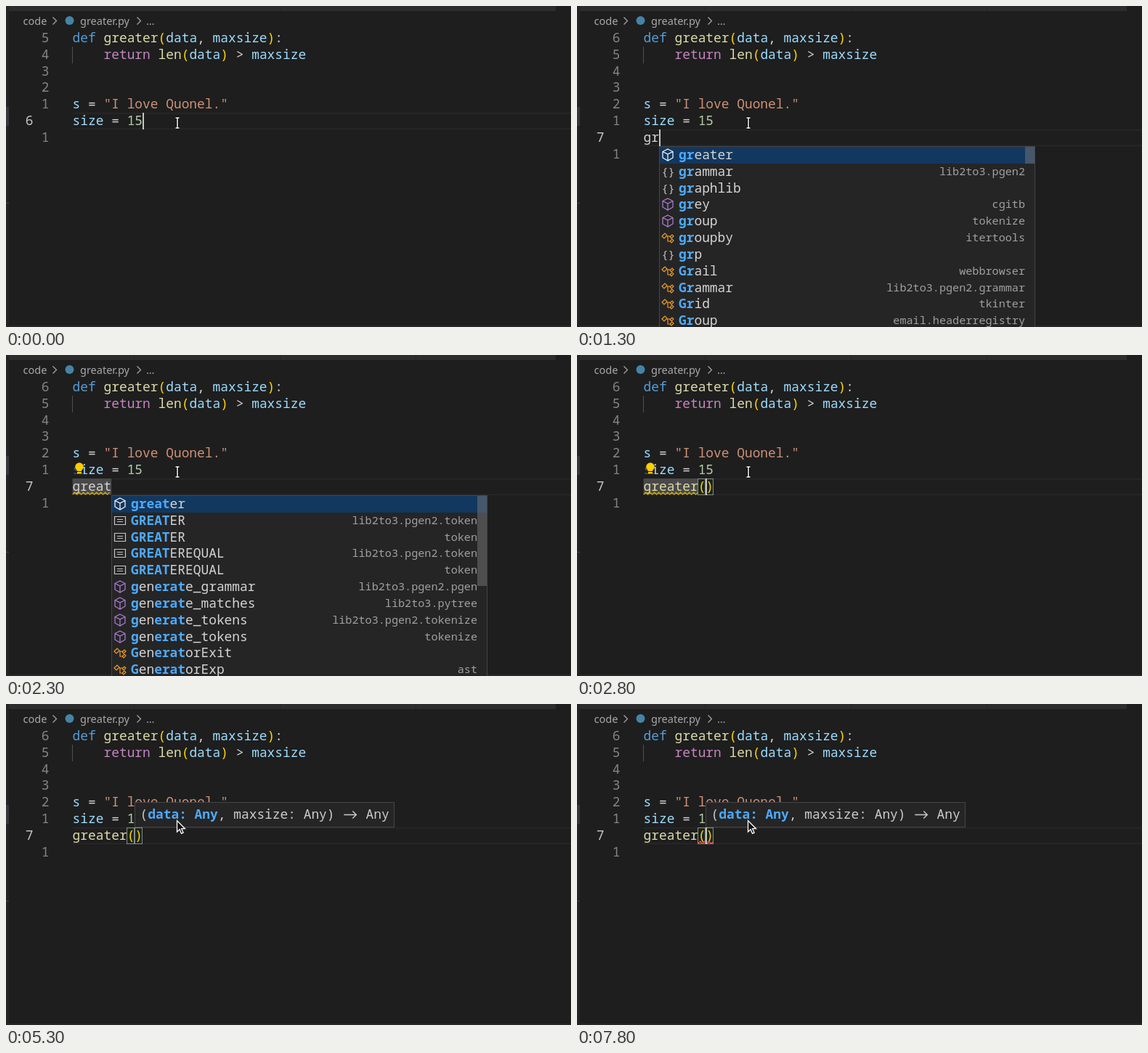
These frames come from a looping animation (778x442 px, 8 s). An HTML page with a canvas:

```html
<!DOCTYPE html>
<html lang="en">
<head>
<meta charset="utf-8">
<style>
  html, body { margin: 0; width: 100%; height: 100%; overflow: hidden; background: #1e1e1e; }
  canvas { display: block; }
</style>
</head>
<body>
<canvas id="stage" width="778" height="442"></canvas>
<script>
const ctx = document.getElementById('stage').getContext('2d');
const LOOP = 8000, LEFT = 91.6, CHAR = 10.72, LINE = 22.83;
const MONO = '"Noto Sans Mono", monospace';
const CODE = `17.87px ${MONO}`, BOLD = `bold ${CODE}`, SMALL = `15.15px ${MONO}`;
const FG = '#d4d4d4', VAR = '#9cdcfe', FUNC = '#dcdcaa', GOLD = '#ffd700', BLUE = '#4daafc';

const colX = col => LEFT + col * CHAR;
const baseline = row => Math.round(50 + row * LINE);
const lineTop = row => Math.round(32.8 + row * LINE);

// Each step: start time, typed text, caret column
const TYPING = [
  [600, '', 0], [1100, 'g', 1], [1200, 'gr', 2], [1500, 'gre', 3], [1600, 'grea', 4],
  [1800, 'great', 5], [2800, 'greater()', 8], [5700, 'greater(?)', 9], [7700, 'greater()', 8],
];

// In labels the matched and unmatched parts alternate, starting with matched
const SHORT = [
  ['cube', 'gr|eater'], ['module', 'gr|ammar', 'lib2to3.pgen2'], ['module', 'gr|aphlib'],
  ['func', 'gr|ey', 'cgitb'], ['func', 'gr|oup', 'tokenize'], ['type', 'gr|oupby', 'itertools'],
  ['module', 'gr|p'], ['type', 'Gr|ail', 'webbrowser'], ['type', 'Gr|ammar', 'lib2to3.pgen2.grammar'],
  ['type', 'Gr|id', 'tkinter'], ['type', 'Gr|oup', 'email.headerregistry'],
];
const longList = (tail, last) => [
  ['cube', tail ? 'great|er' : 'grea|ter'],
  ...['', '', 'EQUAL', 'EQUAL'].map((end, i) => [
    'const', (tail ? 'GREAT|ER' : 'GREA|TER') + end, i % 2 ? 'token' : 'lib2to3.pgen2.token']),
  ...[['grammar', 'lib2to3.pgen2.pgen'], ['matches', 'lib2to3.pytree'],
    ['tokens', 'lib2to3.pgen2.tokenize'], ['tokens', 'tokenize']].map(([end, from]) => [
    'func', (tail ? 'g|en|erat|e_' : 'g|en|era|te_') + end, from]),
  ...last,
];
const GREA = longList(false, [['func', 'ge|tf|ra|meinfo', 'inspect'], ['func', 'ge|tt|ra|ce', 'sys']]);
const GREAT = longList(true, [['type', 'G|en|erat|orExit'], ['type', 'G|en|erat|orExp', 'ast']]);

// Start time, anchor column, rows, scroll thumb height
const POPUPS = [[1300, 2, SHORT, 23], [1600, 3, GREA, 60], [1700, 4, GREA, 60], [1900, 5, GREAT, 124], [2800]];

const CUBE = new Path2D('M0-8 7-4.5V4L0 8-7 4V-4.5ZM-7-4.5 0-1 7-4.5M0-1V8');
const ICONS = {
  cube: ['#fff', CUBE],
  func: ['#b180d7', CUBE],
  type: ['#ee9d28', new Path2D('M-8-2-4-6-1-3-5 1ZM-2-2H4M0-2V5H3M3-1 6-4 8-2 5 1ZM3 5 6 2 8 4 5 7Z')],
  const: ['#c5c5c5', new Path2D('M-7.5-5.5H7.5V5.5H-7.5ZM-4-1.5H4M-4 1.5H4')],
};
const ARROW = new Path2D('M0 0V15.5L3.6 12.2 6 17.8 8.6 16.7 6.2 11.2H11Z');
const IBEAM = new Path2D('M-2.5-7H2.5M-2.5 7H2.5M0-7V7');

function rect(color, x, y, w, h) {
  ctx.fillStyle = color;
  ctx.fillRect(x, y, w, h);
}

function box(x, y, w, h, fill, border) {
  rect(fill, x, y, w, h);
  ctx.strokeStyle = border;
  ctx.lineWidth = 1;
  ctx.strokeRect(x + .5, y + .5, w - 1, h - 1);
}

function text(str, x, y, color, font = CODE, align = 'left') {
  ctx.font = font;
  ctx.textAlign = align;
  ctx.fillStyle = color;
  ctx.fillText(str, x, y);
}

function path(shape, x, y, color, width, fill) {
  ctx.save();
  ctx.translate(x, y);
  ctx.strokeStyle = color;
  ctx.lineWidth = width;
  if (fill) { ctx.fillStyle = fill; ctx.fill(shape); }
  ctx.stroke(shape);
  ctx.restore();
}

// parts: colour, string, colour, string, ...
function code(row, col, ...parts) {
  for (let i = 0; i < parts.length; i += 2) {
    text(parts[i + 1], colX(col), baseline(row), parts[i]);
    col += parts[i + 1].length;
  }
}

function squiggle(from, to, color) {
  ctx.beginPath();
  for (let x = colX(from), up = 0; x <= colX(to); x += 3, up ^= 1) ctx.lineTo(x, up ? 189.2 : 192);
  ctx.strokeStyle = color;
  ctx.lineWidth = 1.3;
  ctx.stroke();
}

function drawFrame() {
  rect('#1e1e1e', 0, 0, 778, 442);
  rect('#252526', 0, 0, 4, 442);
  rect('#37373d', 0, 139, 4, 26);
  rect('#45454a', 0, 271, 4, 1);
  rect('#2d2d2d', 4, 0, 753, 7);
  for (const x of [176, 377, 564]) rect('#252526', x, 0, 1, 7);
  rect('#292929', 4, 440, 774, 2);

  const crumb = '14.5px "Noto Sans", sans-serif';
  text('code', 23.5, 25.5, '#a9a9a9', crumb);
  text('greater.py', 102, 25.5, '#a9a9a9', crumb);
  text('…', 193, 25.5, '#a9a9a9', crumb);
  for (const x of [64.5, 180.5]) path(new Path2D('M0-5 5 0 0 5'), x, 20.5, '#a9a9a9', 1.2);
  ctx.fillStyle = '#4584a6';
  ctx.beginPath();
  ctx.arc(87.5, 20, 6, 0, 7);
  ctx.fill();
}

function drawLines(active) {
  for (const y of [lineTop(active), lineTop(active + 1) - 1.5]) rect('#282828', LEFT, y, 690, 1.5);
  for (let row = 0; row < 8; row++) {
    if (row === active) text(active + 1, 26.8, baseline(row), '#c6c6c6');
    else if (row <= active + 1) text(Math.abs(row - active), 59.5, baseline(row), '#858585', CODE, 'right');
  }
  rect('#505050', 91, 56, 1, 23);
  code(0, 0, '#569cd6', 'def ', FUNC, 'greater', GOLD, '(', VAR, 'data', FG, ', ', VAR, 'maxsize', GOLD, ')', FG, ':');
  code(1, 4, '#c586c0', 'return ', FUNC, 'len', GOLD, '(', VAR, 'data', GOLD, ')', FG, ' > ', VAR, 'maxsize');
  code(4, 0, VAR, 's', FG, ' = ', '#ce9178', '"I love Quonel."');
  code(5, 0, VAR, 'size', FG, ' = ', '#b5cea8', '15');
}

function drawTyped(t, typed) {
  const called = typed.length > 7, word = Math.min(typed.length, 7);
  if (t >= 2200 && t < 3100) rect('#494949', LEFT, 170, word * CHAR, 22);
  if (called) {
    for (const col of [7, typed.length - 1])
      box(Math.floor(colX(col)), 170, 11, 23, 'rgba(0,100,0,.1)', '#888');
  }
  code(6, 0, called ? FUNC : FG, typed.slice(0, 7), GOLD, typed.slice(7, 8),
    '#f44747', typed.slice(8, -1), GOLD, typed.length > 8 ? ')' : '');
  if (t >= 1700 && t < 2200) squiggle(0, t < 2000 ? 4 : 5, '#3794ff');
  if (t >= 2200 && t < 3400) squiggle(0, word, '#cca700');
  if (t >= 5900) squiggle(7, typed.length, '#f14c4c');
}

function drawBulb() {
  rect('rgba(30,30,30,.7)', 91, 148, 16, 21);
  ctx.fillStyle = '#ffcc00';
  ctx.beginPath();
  ctx.arc(101, 154, 5.8, 0, 7);
  ctx.fill();
  ctx.fillRect(98, 158, 6, 5.5);
  rect('#1e1e1e', 98, 160, 6, 1);
}

function drawPopup(col, rows, thumb) {
  const x = Math.floor(colX(col));
  box(x, 193, 518, 260, '#252526', '#454545');
  rect('#12385f', x + 1, 194, 516, 23);
  rows.forEach(([kind, label, from], i) => {
    const y = Math.round(211 + i * LINE);
    if (kind === 'module') text('{}', x + 3.5, y - 1, '#c5c5c5', SMALL);
    else path(ICONS[kind][1], x + 12, y - 6, ICONS[kind][0], 1.2);
    let at = x + 27;
    label.split('|').forEach((part, k) => {
      text(part, at, y, k % 2 ? FG : BLUE, k % 2 ? CODE : BOLD);
      at += part.length * CHAR;
    });
    if (from) text(from, x + 504, y - 1, '#a0a0a0', SMALL, 'right');
  });
  rect('rgba(121,121,121,.5)', x + 504, 194, 13, thumb);
}

function drawHint(col) {
  const x = Math.floor(colX(col)), y = 158;
  box(x, 135, 358, 35, '#252526', '#454545');
  const at = n => x + 7.6 + n * CHAR;
  text('(', at(0), y, '#ccc');
  text('data: Any', at(1), y, BLUE, BOLD);
  text(', maxsize: Any)', at(10), y, '#ccc');
  path(new Path2D('M0 0H17M12-5 17 0 12 5'), at(26) + 2, 152.5, '#ccc', 1.4);
  text('Any', at(29), y, '#ccc');
}

function draw() {
  const t = performance.now() % LOOP;
  const latest = list => list.filter(step => step[0] <= t).pop();
  const [pressed, typed, col] = latest(TYPING) || [-300, '', 9];
  const active = t < 600 ? 5 : 6;

  drawFrame();
  drawLines(active);
  drawTyped(t, typed);
  if (t >= 2300 && t < 3100) drawBulb();
  const popup = latest(POPUPS);
  if (popup && popup[2]) drawPopup(...popup.slice(1));
  if ((t - pressed) % 1000 < 500) rect('#c4c5c3', Math.floor(colX(col)), lineTop(active), 2, 23);
  if (t >= 2900) {
    drawHint(col);
    path(ARROW, 235.5, 160.5, '#fff', 1.3, '#111');
  } else {
    path(IBEAM, 236, 161, '#000', 3.5);
    path(IBEAM, 236, 161, '#fff', 1.5);
  }
  requestAnimationFrame(draw);
}
draw();
</script>
</body>
</html>
```
